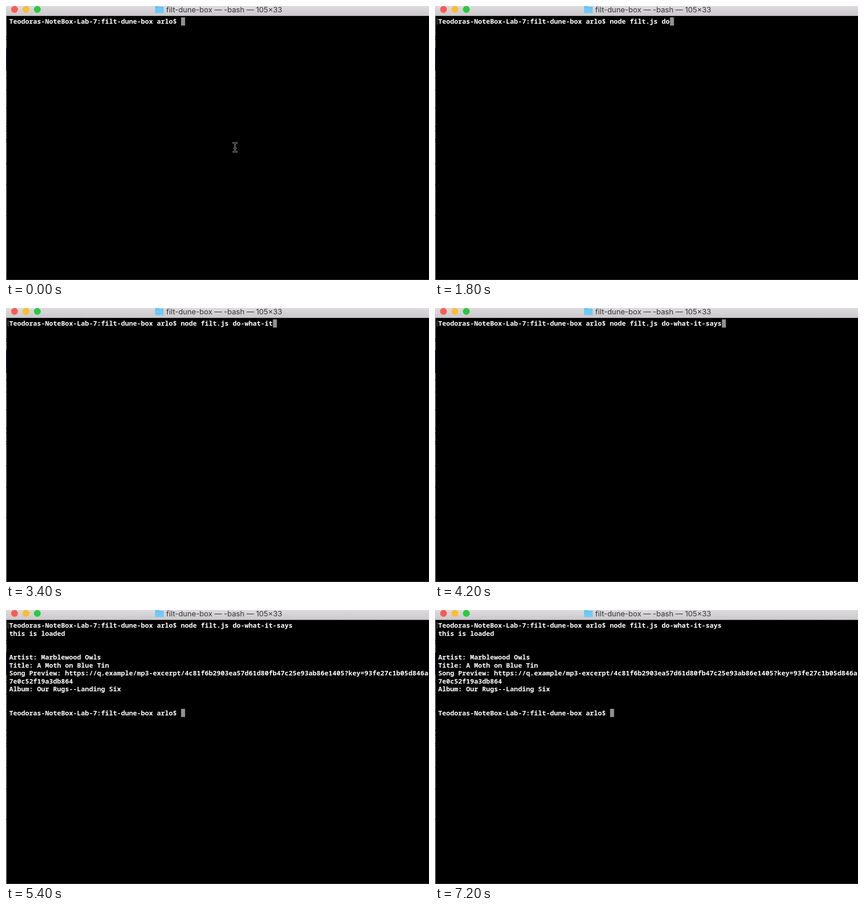
Recreate the animation shown at these times as an HTML page with a canvas. Size 928 by 603 pixels, loop 8000 ms.

```html
<!DOCTYPE html>
<html lang="en">
<head>
<meta charset="utf-8">
<title>Terminal session</title>
<style>
  html, body { margin: 0; width: 100%; height: 100%; overflow: hidden; background: #000; }
  canvas { display: block; }
</style>
</head>
<body>
<canvas id="stage" width="928" height="603"></canvas>
<script>
const ctx = document.getElementById('stage').getContext('2d');
const LOOP = 8000, COL = 8.76, ROW = 17.5, LEFT = 7;
const FOLDER = 'filt-dune-box';
const PROMPT = `Teodoras-NoteBox-Lab-7:${FOLDER} arlo$ `;
const COMMAND = 'node filt.js do-what-it-says';
const OUTPUT = [
  '', '',
  'Artist: Marblewood Owls',
  'Title: A Moth on Blue Tin',
  'Song Preview: https://q.example/mp3-excerpt/4c81f6b2903ea57d61d80fb47c25e93ab86e1405?key=93fe27c1b05d846a',
  '7e0c52f19a3db864',
  'Album: Our Rugs--Landing Six',
  '', '',
  PROMPT
];

// [time in ms, characters typed so far]
const TYPING = [
  [0, 0], [400, 1], [600, 3], [800, 5], [1000, 6], [1200, 13],
  [1600, 14], [1800, 15], [2000, 16], [2200, 18], [2400, 19],
  [2800, 20], [3000, 21], [3200, 22], [3400, 23], [3600, 24], [3800, 25],
  [4000, 27], [4200, 28]
];

function rect(color, x, y, w, h) {
  ctx.fillStyle = color;
  ctx.fillRect(x, y, w, h);
}

function disc(color, x, y, r) {
  ctx.fillStyle = color;
  ctx.beginPath();
  ctx.arc(x, y, r, 0, Math.PI * 2);
  ctx.fill();
}

function drawFolder(x, faded) {
  ctx.fillStyle = faded ? '#a3c6d6' : '#6fc9f7';
  ctx.beginPath();
  ctx.roundRect(x, 0, 9, 6, 1);
  ctx.roundRect(x, 1.5, 19, 14, 1.5);
  ctx.fill();
  rect(faded ? '#93b8c9' : '#5bb8ea', x, 3, 19, 1);
}

function drawTitleBar(running) {
  const shade = ctx.createLinearGradient(0, 0, 0, 21);
  shade.addColorStop(0, '#dddbdd');
  shade.addColorStop(1, '#cbc9cb');
  rect(shade, 0, 0, 928, 21);
  rect('#a9a8a9', 0, 21, 928, 1);
  ['#fc5b55', '#fdbc31', '#2ac940'].forEach((color, i) => disc(color, 18.7 + 25 * i, 7.5, 7.5));
  if (running) disc('#4d0705', 18.7, 7.5, 2.6);

  const x = running ? 248 : 327;
  drawFolder(x, running);
  ctx.font = '16.3px Inter, sans-serif';
  ctx.fillStyle = '#343334';
  ctx.fillText(`${FOLDER} — ${running ? COMMAND : '-bash'} — 105×33`, x + 24.5, 14);
}

function drawWindowEdge() {
  rect('#8f8f8f', 0, 22, 1.4, 581);
  rect('#101a40', 0, 93, 1.4, 50);
  for (const y of [67, 72, 157, 184, 223, 264, 274, 293, 298, 346, 393, 460]) {
    rect('#222', 0, y, 1.4, 2);
  }
  rect('#3a3a3a', 0, 602, 928, 1);
}

function drawTerminal(lines, marked) {
  ctx.font = '600 14.6px "Noto Sans Mono", monospace';
  const last = lines.length - 1;
  rect('#929092', LEFT + lines[last].length * COL + 0.4, 25 + last * ROW, 8.8, 18);
  ctx.fillStyle = '#fff';
  lines.forEach((line, i) => ctx.fillText(line, LEFT, 39 + i * ROW));
  if (marked) {
    rect('#777', 4, 28, 1, 12);
    rect('#777', 4, 28, 2.5, 1);
    rect('#777', 4, 39, 2.5, 1);
  }
}

function drawPointer(x, y) {
  const beam = new Path2D('M-4-10Q0-10 0-6V6Q0 10-4 10M4-10Q0-10 0-6M4 10Q0 10 0 6M-2 2H2');
  ctx.save();
  ctx.translate(x, y);
  ctx.lineCap = 'round';
  for (const [color, width] of [['#c8c8c8', 3], ['#000', 1.4]]) {
    ctx.strokeStyle = color;
    ctx.lineWidth = width;
    ctx.stroke(beam);
  }
  ctx.restore();
}

function draw(t) {
  const running = t >= 5000 && t < 5400;
  const typed = TYPING.findLast(([start]) => t >= start)[1];
  const lines = [PROMPT + COMMAND.slice(0, typed)];
  if (t >= 5000) lines.push('this is loaded');
  if (t >= 5400) lines.push(...OUTPUT);
  else if (t >= 4800) lines.push('');

  rect('#000', 0, 0, 928, 603);
  drawWindowEdge();
  drawTitleBar(running);
  drawTerminal(lines, t >= 1200);

  if (t < 400) drawPointer(502.5, 311);
  else if (t >= 5600 && t < 7200) drawPointer(502.5, 308 - 20 * Math.floor((t - 5600) / 200));
}

const start = performance.now();
function tick() {
  draw((performance.now() - start) % LOOP);
  requestAnimationFrame(tick);
}
tick();
</script>
</body>
</html>
```
